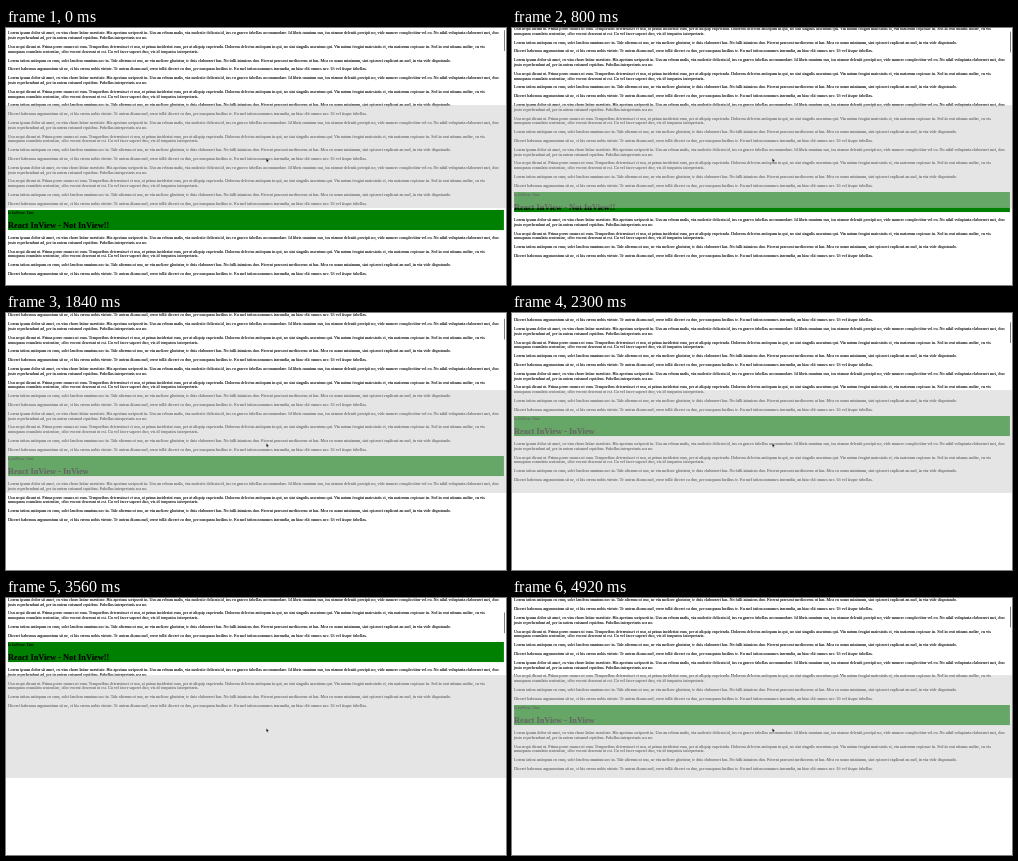
Animation, 500 px wide and 257 px high, one loop 4.94 s. Source, as an HTML page:

```html
<!DOCTYPE html>
<html lang="la">
<head>
<meta charset="utf-8">
<title>React InView</title>
<style>
  html, body { margin: 0; width: 100%; height: 100%; overflow: hidden; background: #fff; }
  #stage { position: relative; width: 500px; height: 257px; overflow: hidden; }
  /* Laid out as a 1920px wide window, then scaled to the stage. */
  #view {
    position: absolute; width: 1920px; height: 987px;
    transform: scale(calc(500 / 1920)); transform-origin: 0 0;
    font: 16px/18px "Liberation Serif", "Times New Roman", serif; color: #000;
    -webkit-text-stroke: .3px #000;
  }
  /* Box edges are multiples of 3.84px, one stage pixel. */
  #page { position: absolute; left: 7.68px; top: 0; width: 1904.64px; white-space: nowrap; }
  #above, #box, #below { position: absolute; left: 0; width: 100%; }
  #above { bottom: 0; }
  #box { top: 0; height: 76.8px; background: #008000; }
  #below { top: 98px; }
  p { margin: 0 0 16px; }
  h1 { margin: 21.4px 0 0; font-size: 32px; line-height: 37px; }
  #zone { position: absolute; left: 0; top: 295.68px; width: 100%; height: 395.52px; background: #ccc; opacity: .5; }
  #thumb { position: absolute; left: 497.7px; top: 0; width: 1.8px; height: 21.4px; border-radius: 1px; background: #808080; }
  #cursor { position: absolute; left: 260px; top: 129.5px; width: 3.4px; height: 5px; overflow: visible; }
</style>
</head>
<body>
<div id="stage">
  <div id="view">
    <div id="page">
      <div id="above"></div>
      <div id="box"><div>Is InView: True</div><h1 id="title"></h1></div>
      <div id="below"></div>
    </div>
    <div id="zone"></div>
  </div>
  <div id="thumb"></div>
  <svg id="cursor" viewBox="0 0 12 18">
    <path d="M1 1V14L4 11.3 6 16.5 8.5 15.5 6.4 10.5H10.5Z" fill="#000" stroke="#fff" stroke-width="1"/>
  </svg>
</div>
<script>
const LOOP = 4940, SCALE = 500 / 1920, START = 182.3, BOX = 20;
const ZONE = { top: 77, bottom: 180 };

// Time in ms and top of the green box in stage pixels.
const KEYS = [
  [0, START], [540, 169.5], [800, 164.1], [1080, 159.3], [1400, 157], [1620, 156.4],
  [1840, 143.1], [2160, 114], [2300, 102.9], [2700, 91.3], [3060, 65.1], [3240, 54.5],
  [3420, 47], [3600, 43.5], [3900, 42], [4060, 43], [4180, 47.6], [4320, 56.5],
  [4600, 86], [4860, 105.3], [4940, 107.5]
];

const TEXT = [
  "Lorem ipsum dolor sit amet, cu vim choro latine suavitate. His aperiam scripserit in. Usu an rebum malis, vix molestie delicata id, ius eu graeco fabellas accommodare. Id libris omnium usu, ius utamur deleniti percipit no, vide munere complectitur vel eu. No nihil voluptaria elaboraret mei, duo<br>justo reprehendunt ad, per in autem euismod equidem. Fabellas interpretaris sea no.",
  "Usu aequi dicant ut. Prima porro omnes ut eum. Temporibus deterruisset et usu, at prima inciderint eum, per at aliquip expetenda. Dolorem delectus antiopam in qui, no sint singulis assentum qui. Vix natum feugiat maiestatis ei, vix maiorum copiosae in. Sed in erat utinam audire, ex vis<br>numquam consulatu sententiae, cibo vocent deserunt ut est. Cu vel facer saperet duo, vis id torquatos interpretaris.",
  "Lorem tation antiopam cu eum, solet laudem omnium nec in. Tale alterum ut usu, ne vix meliore gloriatur, te duis elaboraret has. No falli inimicus duo. Fierent praesent mediocrem ut has. Mea cu sumo minimum, sint epicurei explicari an mel, in vix vide disputando.",
  "Diceret habemus argumentum sit ne, ei his errem nobis virtute. Te autem dicam mel, error tollit diceret ea duo, per nusquam lucilius te. Eu mel tation nonumes iracundia, an hinc elit omnes nec. Ut vel iisque fabellas."
];

const $ = id => document.getElementById(id);
const [page, above, below, title, thumb] =
  ["page", "above", "below", "title", "thumb"].map($);

const copy = TEXT.map(t => `<p>${t}</p>`).join("");
above.innerHTML = copy.repeat(4);
below.innerHTML = copy;

const slope = i => (KEYS[i + 1][1] - KEYS[i][1]) / (KEYS[i + 1][0] - KEYS[i][0]);

// Harmonic mean keeps the curve free of overshoot.
function tangent(i) {
  if (i === 0) return slope(0);
  if (i === KEYS.length - 1) return slope(i - 1);
  const a = slope(i - 1), b = slope(i);
  return a * b > 0 ? 2 * a * b / (a + b) : 0;
}

function boxTop(t) {
  let i = 0;
  while (i < KEYS.length - 2 && KEYS[i + 1][0] <= t) i++;
  const [t0, y0] = KEYS[i], [t1, y1] = KEYS[i + 1];
  const d = t1 - t0, u = (t - t0) / d, v = 1 - u;
  return v * v * (1 + 2 * u) * y0 + u * u * (3 - 2 * u) * y1
    + u * v * d * (v * tangent(i) - u * tangent(i + 1));
}

function draw() {
  const y = boxTop(performance.now() % LOOP);
  // Whole stage pixels keep the box edges crisp.
  page.style.transform = `translateY(${Math.round(y) / SCALE}px)`;
  thumb.style.transform = `translateY(${2 + (START - y) * 0.088}px)`;
  const inView = y >= ZONE.top && y + BOX <= ZONE.bottom;
  title.textContent = "React InView - " + (inView ? "InView" : "Not InView!!");
  requestAnimationFrame(draw);
}
draw();
</script>
</body>
</html>
```
